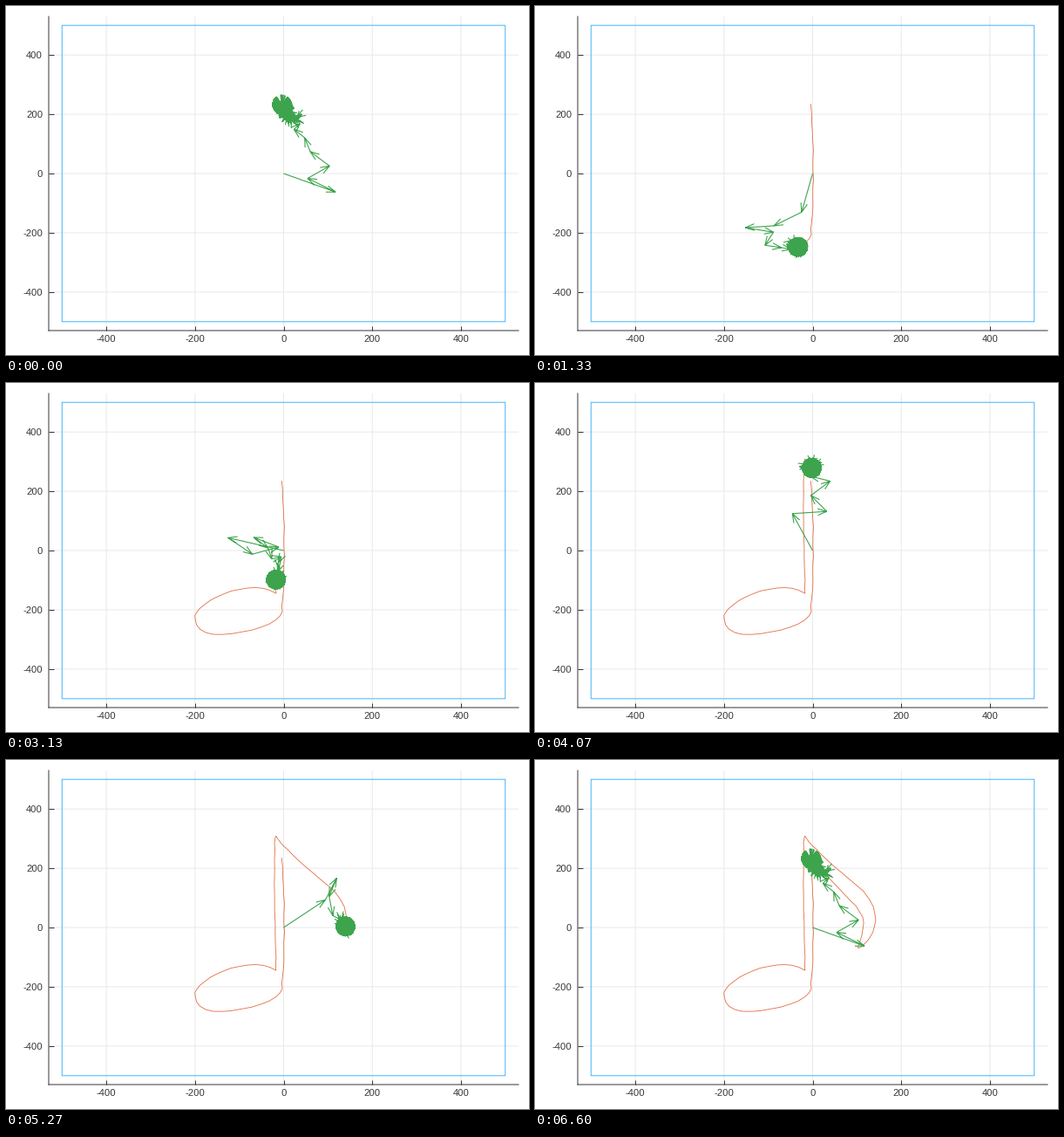
These frames come from a looping animation (600 px wide and 400 px high, 6670 ms). A matplotlib script:

```python
import numpy as np
import matplotlib.pyplot as plt
from matplotlib.animation import FuncAnimation

LOOP, STEPS = 6670, 99
SUB = 3  # drawn frames per step, so that steps land on the nearest moment
FRAMES = (STEPS + 1) * SUB
LIMIT = 530
LEFT, TOP, WIDTH, HEIGHT = 49, 12, 539, 360
PX = 0.72  # points per pixel at 100 dpi
HEAD, SPREAD = 11, np.radians(20)
INK, GREEN, ORANGE, BLUE = "#363636", "#3da44d", "#e26f46", "#45b5fa"

# The note as Bezier curves: steps taken, two handles, end point
START = -4 + 234j
CURVES = [
    (16, 3 + 90j, 3 - 155j, -5 - 194j),              # stem, downwards
    (14, 20 - 255j, -202 - 340j, -199 - 230j),       # head, lower half
    (14, -212 - 185j, -78 - 82j, -17 - 145j),        # head, upper half
    (15, -17 - 145j, -25 + 308j, -18 + 308j),        # stem, upwards
    (15, 15 + 240j, 112 + 128j, 115 + 121j),         # flag
    (14, 190 + 0j, 83 - 103j, 104 - 60j),
    (11, 133 + 65j, 106 + 42j, START),
]


def bezier(a, b, c, d, n):
    u = np.arange(n) / n
    v = 1 - u
    return v**3 * a + 3 * v * v * u * b + 3 * v * u * u * c + u**3 * d


def hand_drawn():
    """Samples along the note with a slight wobble of the pen."""
    parts, at = [], START
    for steps, b, c, end in CURVES:
        parts.append(bezier(at, b, c, end, steps * SUB))
        at = end
    path = np.concatenate(parts)
    rng = np.random.default_rng(4)
    wobble = rng.normal(0, 0.6, (2, len(path)))
    return path + wobble[0] + 1j * wobble[1]


# Rotating arrows, longest first; similar lengths keep the order of the transform
outline = hand_drawn()
size = len(outline)
coef = np.fft.fft(outline) / size
freq = np.fft.fftfreq(size, 1 / size)
order = np.argsort(-np.round(5 * np.log(abs(coef))), kind="stable")
coef, freq = coef[order], freq[order]


def arrows(step):
    """Joints of the arrow chain at one step, starting at the origin."""
    spin = coef * np.exp(2j * np.pi * freq * step / STEPS)
    return np.concatenate([[0], np.cumsum(spin)])


SX, SY = WIDTH / (2 * LIMIT), HEIGHT / (2 * LIMIT)


def chain_line(joints):
    """One broken line holding every shaft and open arrowhead."""
    p = joints.real * SX + 1j * joints.imag * SY
    tail, tip = p[:-1], p[1:]
    back = HEAD * np.exp(1j * np.angle(tail - tip))
    gap = np.full(len(tip), np.nan + 0j)
    turn = np.exp(1j * SPREAD)
    rows = [tail, tip, gap, tip + back * turn, tip, tip + back / turn, gap]
    line = np.column_stack(rows).ravel()
    return line.real / SX, line.imag / SY


plt.rcParams["path.snap"] = False
fig = plt.figure(figsize=(6, 4), dpi=100, facecolor="white")
ax = fig.add_axes([LEFT / 600, 1 - (TOP + HEIGHT) / 400, WIDTH / 600, HEIGHT / 400])
ax.set(xlim=(-LIMIT, LIMIT), ylim=(-LIMIT, LIMIT))
ticks = range(-400, 401, 200)
names = [str(v) for v in ticks]
ax.set_xticks(ticks, names)
ax.set_yticks(ticks, names)
ax.tick_params(direction="in", length=5.5 * PX, width=PX, color=INK,
               labelcolor=INK, labelsize=11.3 * PX, labelfontfamily="Liberation Sans")
ax.tick_params(axis="x", pad=5 * PX)
ax.tick_params(axis="y", pad=7 * PX)
ax.grid(color="#e9e9e9", linewidth=PX)
ax.set_axisbelow(True)
for side in ("top", "right"):
    ax.spines[side].set_visible(False)
for side in ("left", "bottom"):
    ax.spines[side].set(color=INK, linewidth=PX)

ax.add_patch(plt.Rectangle((-500, -500), 1000, 1000, fill=False,
                           edgecolor=BLUE, linewidth=PX))
trace, = ax.plot([], [], color=ORANGE, linewidth=0.85 * PX, zorder=3)
chain, = ax.plot([], [], color=GREEN, linewidth=1.1 * PX, zorder=4,
                 solid_capstyle="butt", solid_joinstyle="bevel")
tips = np.array([arrows(k)[-1] for k in range(STEPS + 1)])


def draw(i):
    step = min((i + 1) // SUB, STEPS)
    trace.set_data(tips[:step + 1].real, tips[:step + 1].imag)
    chain.set_data(*chain_line(arrows(step)))
    return trace, chain


anim = FuncAnimation(fig, draw, frames=FRAMES, interval=LOOP / FRAMES,
                     repeat=True, repeat_delay=0)
plt.show()
```
